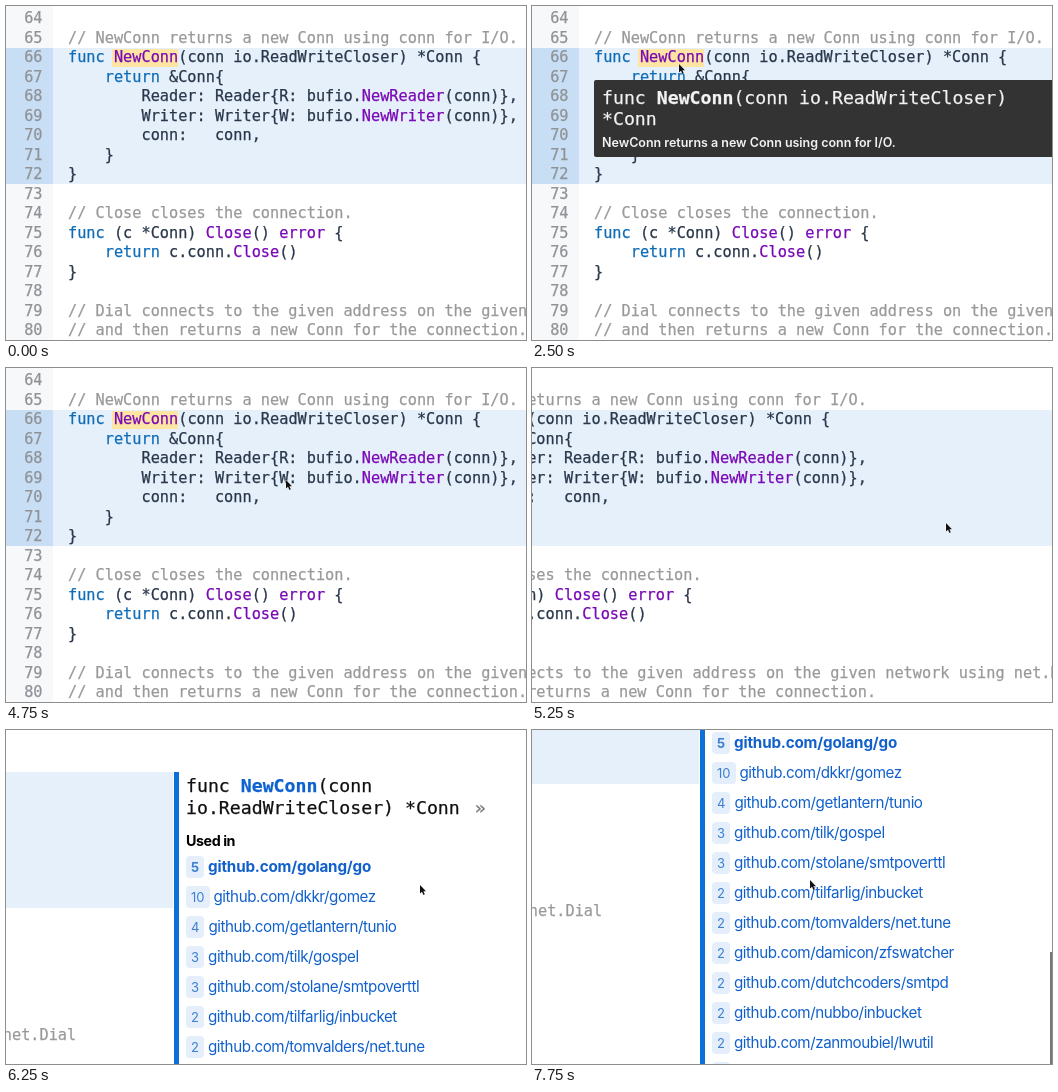
An HTML page for the animation above (8000 ms loop, 520 px wide and 334 px high).

```html
<!DOCTYPE html>
<html lang="en">
<head>
<meta charset="utf-8">
<title>Code hover tour</title>
<style>
html, body { margin: 0; width: 100%; height: 100%; overflow: hidden; background: #fff; }
#stage { position: relative; width: 520px; height: 334px; overflow: hidden; background: #fff; }
#page, #page > *, #panel > *, #cursor, #bar { position: absolute; }
pre, .tip, .sig { margin: 0; font-family: "DejaVu Sans Mono", monospace; white-space: pre; -webkit-text-stroke: .25px; }
pre { font-size: 15.25px; line-height: 19.5px; top: 3px; color: #29374a; }
#gutter { left: 0; top: -20px; width: 47px; height: 800px; background: #f6f8fa; }
#block { left: 0; top: 42px; width: 829px; height: 136px; background: linear-gradient(90deg, #c7def5 47px, #e5f0fb 47px); }
#nums { left: 0; width: 36.5px; text-align: right; color: #8f9296; }
#code { left: 62px; }
.k { color: #0f6cb6; }
.f { color: #7a08b5; }
.c { color: #999; }
.mark { height: 18px; }
.tip { left: 62px; box-sizing: border-box; background: #333; color: #f2f2f2; border-radius: 2px; padding: 7px 8px; font-size: 18.2px; line-height: 21px; }
.tip p, #panel { font-family: Inter, sans-serif; }
.tip p { margin: 7px 0 0; font-size: 12.5px; font-weight: 600; line-height: 14px; letter-spacing: -.02px; -webkit-text-stroke: 0; }
#panel { left: 829.5px; top: 42px; width: 400px; height: 700px; border-left: 5px solid #0d6fd8; background: #fff; letter-spacing: -.45px; }
.sig { left: 7.5px; top: 3px; font-size: 18.2px; line-height: 22px; letter-spacing: 0; color: #111; }
.sig b { color: #0d62d0; }
.sig i { font-style: normal; color: #777; margin-left: 15px; }
.used { left: 7.5px; top: 59px; font: 700 14.3px/20px Inter, sans-serif; }
.repo { left: 7.5px; font-size: 15.2px; line-height: 22px; white-space: nowrap; color: #1160cc; }
.repo.top { font-weight: 700; letter-spacing: -.18px; }
.repo span { display: inline-block; box-sizing: border-box; min-width: 18px; margin-right: 4px; padding: 0 5px; border-radius: 4px; background: #e4effb; font-size: 13px; letter-spacing: 0; text-align: center; color: #3f7fcf; }
#cursor { left: 0; top: 0; overflow: visible; }
#bar { right: 0; width: 2px; height: 300px; background: #777; }
</style>
</head>
<body>
<div id="stage">
  <div id="page">
    <div id="gutter"></div>
    <div id="block"></div>
    <div class="mark" style="left:106px;top:42.5px;width:66px;background:#ffe5a3"></div>
    <div class="mark" id="hover" style="left:135px;top:81.5px;width:56px;background:#fffabf"></div>
    <pre id="nums"></pre>
    <pre id="code"></pre>
    <div class="tip" id="tipReader" style="top:104px;width:235px;height:35px"><b>(Conn).Reader</b> Reader</div>
    <div class="tip" id="tipConn" style="top:74px;width:490px;height:77px">func <b>NewConn</b>(conn io.ReadWriteCloser)
*Conn<p>NewConn returns a new Conn using conn for I/O.</p></div>
    <div id="panel">
      <div class="sig">func <b>NewConn</b>(conn
io.ReadWriteCloser) *Conn<i>»</i></div>
      <div class="used">Used in</div>
    </div>
  </div>
  <div id="bar"></div>
  <svg id="cursor" width="10" height="14"><path d="M0 0V8.5L2 6.7 3.4 9.9 4.8 9.3 3.4 6.2H6Z" fill="#111" stroke="#fff" stroke-width=".8" paint-order="stroke"/></svg>
</div>
<script>
const $ = id => document.getElementById(id);

const source = `
// NewConn returns a new Conn using conn for I/O.
func NewConn(conn io.ReadWriteCloser) *Conn {
    return &Conn{
        Reader: Reader{R: bufio.NewReader(conn)},
        Writer: Writer{W: bufio.NewWriter(conn)},
        conn:   conn,
    }
}

// Close closes the connection.
func (c *Conn) Close() error {
    return c.conn.Close()
}

// Dial connects to the given address on the given network using net.Dial
// and then returns a new Conn for the connection.`.split("\n");

const paint = line => line.startsWith("//")
  ? `<span class="c">${line}</span>`
  : line.replace(/&/g, "&amp;")
      .replace(/\b(func|return)\b|\b(New\w+|Close|error)\b/g,
        (word, key) => `<span class="${key ? "k" : "f"}">${word}</span>`);

$("code").innerHTML = source.map(paint).join("\n");
$("nums").textContent = Array.from({ length: 24 }, (_, i) => 64 + i).join("\n");

const repos = ["5 golang/go", "10 dkkr/gomez", "4 getlantern/tunio", "3 tilk/gospel",
  "3 stolane/smtpoverttl", "2 tilfarlig/inbucket", "2 tomvalders/net.tune",
  "2 damicon/zfswatcher", "2 dutchcoders/smtpd", "2 nubbo/inbucket",
  "2 zanmoubiel/lwutil", "2 "];
repos.forEach((repo, i) => {
  const [count, path] = repo.split(" ");
  const row = document.createElement("div");
  row.className = i ? "repo" : "repo top";
  row.style.top = 83.8 + i * 30.05 + "px";
  row.innerHTML = `<span>${count}</span>${path && "github.com/" + path}`;
  $("panel").append(row);
});

// Keys are [time, x, y]; straight lines between them.
const pointer = [[500, 41, 231], [1000, 78, 216], [1500, 117, 194], [1750, 137, 86], [2000, 138, 85],
  [2250, 142, 71], [2500, 147, 58], [2750, 148, 57], [3000, 148, 57], [3250, 146, 48],
  [3500, 142, 44], [3750, 139, 51], [4000, 138, 57], [4500, 138, 57], [4750, 280, 112],
  [5000, 414, 155], [6500, 414, 155], [7750, 278, 150]];
const scroll = [[4750, 0, 0], [5000, 42, 0], [5250, 177, 0], [5500, 385, 0], [5750, 560, 0],
  [6000, 640, 0], [6250, 662, 0], [6500, 662, 8], [7000, 662, 62], [7500, 662, 114], [7750, 662, 124]];

function at(keys, t) {
  const n = keys.findIndex(k => k[0] > t);
  if (n < 1) return (n ? keys[keys.length - 1] : keys[0]).slice(1);
  const [a, b] = [keys[n - 1], keys[n]];
  const p = (t - a[0]) / (b[0] - a[0]);
  return [a[1] + (b[1] - a[1]) * p, a[2] + (b[2] - a[2]) * p];
}

const show = (id, on) => $(id).style.visibility = on ? "visible" : "hidden";
const move = (id, x, y) => $(id).style.transform = `translate(${x}px, ${y}px)`;

function draw(now) {
  const t = Math.floor(now % 8000 / 250) * 250; // four pictures a second
  const [x, y] = at(scroll, t);
  move("page", -x, -y);
  move("cursor", ...at(pointer, t));
  show("cursor", t >= 500);
  show("hover", t >= 1750 && t < 2250);
  show("tipReader", t >= 1750 && t < 2500);
  show("tipConn", t >= 2500 && t < 3500);
  show("bar", y > 0);
  $("bar").style.top = 210 + y * .1 + "px";
}

const start = performance.now();
function loop() {
  draw(performance.now() - start);
  requestAnimationFrame(loop);
}
loop();
</script>
</body>
</html>
```
